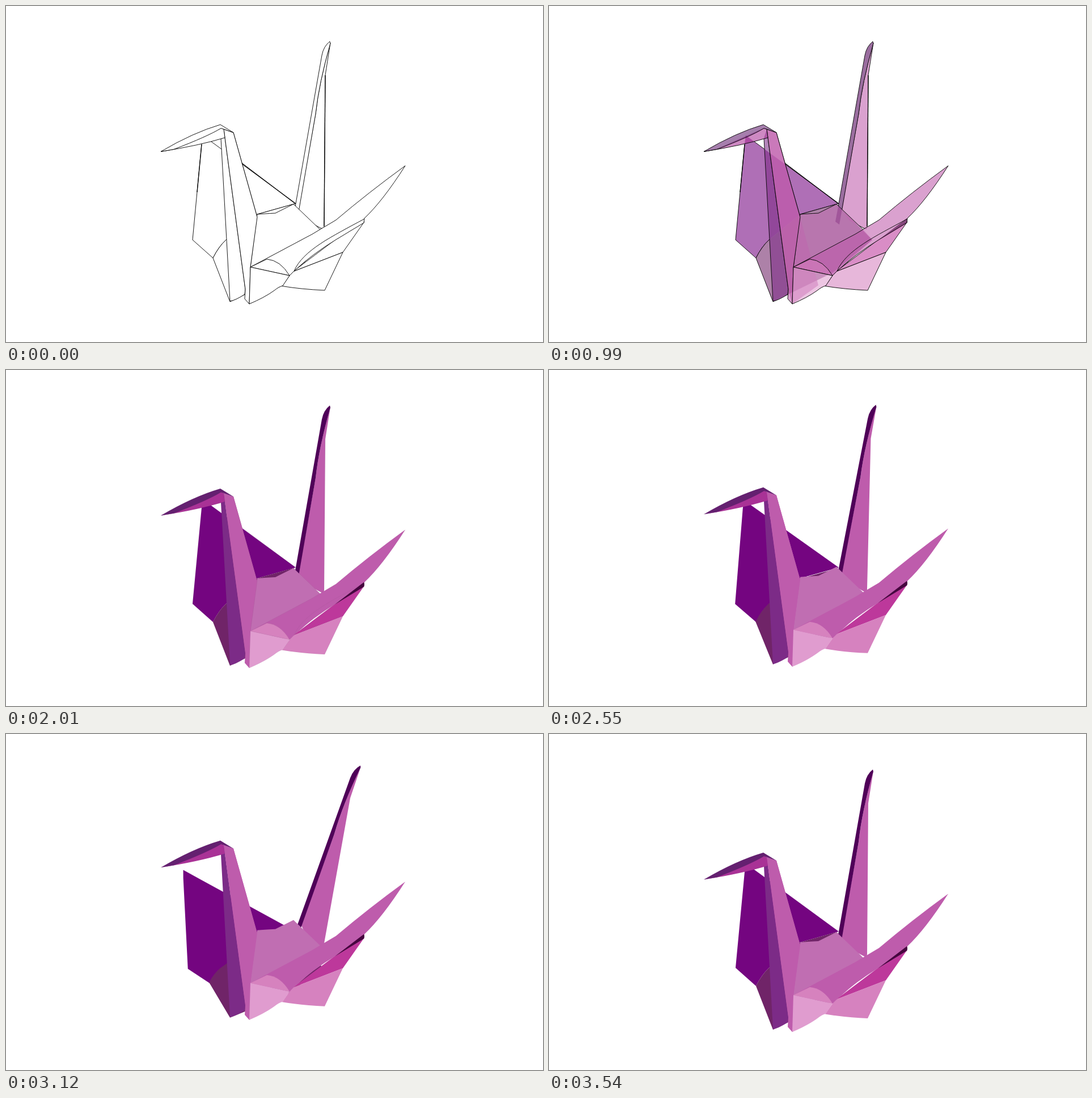
An HTML page for the animation above (4500 ms loop, 947 by 592 pixels).

```html
<!DOCTYPE html>
<html lang="en">
<head>
<meta charset="utf-8">
<title>Paper crane</title>
<style>
  html, body { margin: 0; width: 100%; height: 100%; overflow: hidden; background: #fff; }
  svg { display: block; width: 100%; height: 100%; }
  #lines { stroke: #000; stroke-width: .9; stroke-linejoin: round; mix-blend-mode: multiply; }
  #lines .crease { fill: none; }
  #lines .bold { fill: none; stroke-width: 1.3; }
</style>
</head>
<body>
<svg viewBox="0 0 947 592"><g id="fills"></g><g id="lines"></g></svg>
<script>
const LOOP = 4500, STEP = 30;
const pink = "#be5cac";

// Facets from back to front: moving part, colour, outline
const facets = [
  ["farWing", "#740580", "M347 228L345 243 329 412 365 444Q375 424 388 412L443 367 511 348Z"],
  ["inner", "#702468", "M365 444Q375 424 388 412L443 367 507 349 570 412 500 470 395 521Z"],
  ["tail", pink, "M572 65L563 122 561 388 560 394 530 378 516 358 546 190Q552 135 572 65Z"],
  ["tail", "#4f0058", "M571 62.500Q560 71 557 87L511 348 505 380 512 385 517 357 546 190Q552 135 572 66Z"],
  ["body", pink, "M384 217L401 223 443 372 475 492 429 525 422 499Z"],
  ["body", "#c06eb2", "M443 367Q455 366 475 365L507 349 553 393 570 412 500 475 431 460Z"],
  ["body", "#7c2b87", "M379 233L384 217 422 499 421 508Q404 519 395 520L389 412Z"],
  ["body", pink, "M384 217L401 223 443 372 431 460 429 525 421 516 422 499Z"],
  ["body", "#a93296", "M273 256.500L296 252 379 215 384 217 386 232Q340 246 273 256.500Z"],
  ["body", "#642070", "M273 256.500Q330 223 378 209L401 223 384 217 379 215.500Q355 230 296 252.500Z"],
  ["body", "#bd389b", "M632 380L594 434 506 468 583 410Z"],
  ["body", "#d682bf", "M506 468L594 434 562 501Q520 499 487 493.500L500 475Z"],
  ["body", pink, "M704 281.500Q640 328 582 377 560 390 540 402L431 460 500 475 508 467Q540 437 583 411L631 382 632 374Q664 344 704 281.500Z"],
  ["body", "#d682be", "M431 460L460 446Q484 448 500 475Z"],
  ["body", "#e09ccf", "M431 460L500 475 488 493Q482 494 472 502 455 514 429 525Z"]
];
const shade = ["body", "#46063f", "M631 374Q633 378 631 382L580 413Z"];
const crease = ["body", "none", "M508 467C524 430 575 406 632 375"];
const bold = [
  ["farWing", "none", "M345 244L337 328M416 277L510 348"],
  ["tail", "none", "M563 122L561 388"]
];

const parts = { farWing: [], inner: [], tail: [], body: [] };

function add(layer, [part, fill, d], name = "") {
  const path = document.createElementNS("http://www.w3.org/2000/svg", "path");
  path.setAttribute("d", d);
  path.setAttribute("fill", fill);
  path.setAttribute("class", name);
  layer.append(path);
  parts[part].push(path);
}

const fills = document.getElementById("fills");
const lines = document.getElementById("lines");
[...facets, shade].forEach(f => add(fills, f));
// White faces hide the edges behind them; multiplying keeps only the ink
facets.forEach(([part, , d]) => add(lines, [part, "#fff", d]));
add(lines, crease, "crease");
bold.forEach(f => add(lines, f, "bold"));

const clamp = x => Math.max(0, Math.min(1, x));

// Leans a part about a fixed point: added x scale, y shear, x shear, y scale
const lean = (x, y, k, a, b, c, d) =>
  `translate(${x} ${y}) matrix(${1 + a * k} ${b * k} ${c * k} ${1 + d * k} 0 0) translate(${-x} ${-y})`;

function draw(t) {
  const k = Math.max(0, 1 - Math.pow(Math.abs(t - 3030) / 502, 2.3));
  const lift = `translate(0 ${-21.7 * k})`;
  const pose = {
    farWing: lean(511, 349, k, .1, -.03, .155, -.057),
    inner: lift + lean(395, 521, k, 0, 0, .09, -.2),
    tail: `${lift} rotate(${9.95 * k} 515 386)`,
    body: lift
  };
  for (const part in parts)
    for (const path of parts[part]) path.setAttribute("transform", pose[part]);
  fills.setAttribute("fill-opacity", clamp((t - 510) / 840));
  lines.setAttribute("opacity", 1 - clamp((t - 1380) / 660));
}

const start = performance.now();
function tick() {
  const t = (performance.now() - start) % LOOP;
  draw(Math.floor(t / STEP) * STEP);
  requestAnimationFrame(tick);
}
tick();
</script>
</body>
</html>
```
